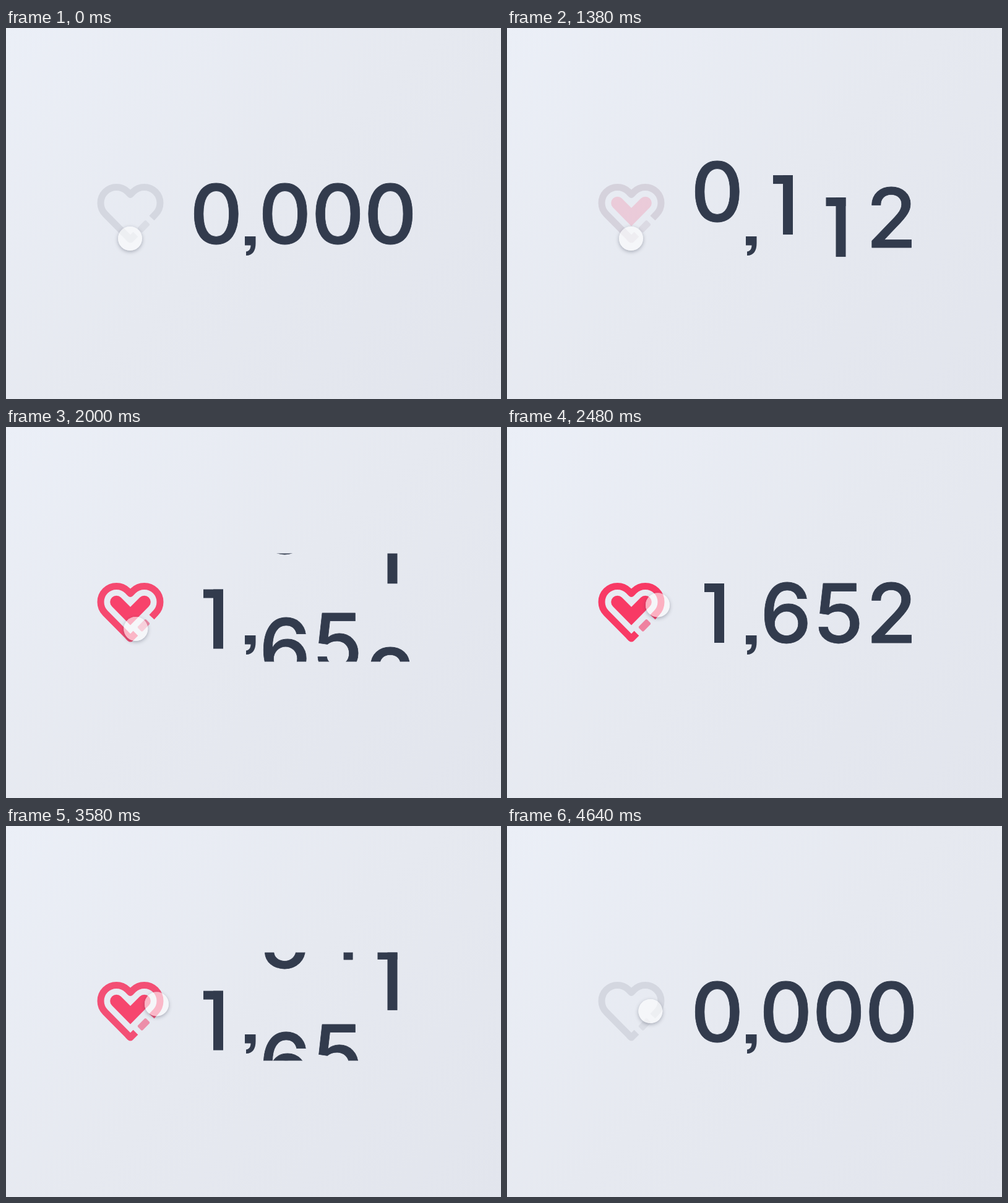
These frames come from a looping animation (800x600 px, 4660 ms). An HTML page with a canvas:

```html
<!DOCTYPE html>
<html lang="en">
<head>
<meta charset="utf-8">
<title>Like counter</title>
<style>
  html, body { margin: 0; width: 100%; height: 100%; overflow: hidden; background: #e6e9f0; }
  canvas { display: block; width: 800px; height: 600px; }
</style>
</head>
<body>
<canvas id="stage" width="800" height="600"></canvas>
<script>
const ctx = document.getElementById('stage').getContext('2d');
const LOOP = 4660;
const INK = '#323b4d';
const FONT = '500 132.5px Inter, "Open Sans", sans-serif';
const BASE = 349;     // baseline of the resting digits
const STEP = 201;     // distance between digits on a reel
const REELS = [
  { x: 340, digits: '01' },
  { x: 451, digits: '0123456' },
  { x: 536.5, digits: '012345' },
  { x: 621.5, digits: '012345678912' }
];
const GREY = [212, 215, 224], LIGHT_GREY = [218, 221, 229];
const PINK = [248, 58, 101], SOFT_PINK = [239, 130, 160];
const LOW = [200.5, 340.5], HIGH = [243.5, 288];

const clamp = v => Math.min(1, Math.max(0, v));
const span = (t, start, length) => clamp((t - start) / length);
const mix = (a, b, k) => a + (b - a) * k;
const blend = (a, b, k) => `rgb(${a.map((v, i) => mix(v, b[i], k)).join()})`;
const cubic = k => k < 0.5 ? 4 * k ** 3 : 1 - 4 * (1 - k) ** 3;

// Cubic Bézier easing through (x1, 0) and (x2, 1).
function ease(k, x1 = 0.704, x2 = 0.511) {
  if (k <= 0 || k >= 1) return clamp(k);
  let lo = 0, hi = 1;
  for (let i = 0; i < 30; i++) {
    const u = (lo + hi) / 2, v = 1 - u;
    if (3 * u * v * v * x1 + 3 * u * u * v * x2 + u ** 3 < k) lo = u; else hi = u;
  }
  return 3 * lo * lo - 2 * lo ** 3;
}

const backdrop = ctx.createLinearGradient(50, -50, 750, 650);
backdrop.addColorStop(0, '#ebeff7');
backdrop.addColorStop(0.5, '#e6e9f0');
backdrop.addColorStop(1, '#e2e5ed');

function digit(ch, cx, dy) {
  if (ch === '1') {
    // A one with a flat flag.
    ctx.fillRect(cx - 21, 253 + dy, 32, 14);
    ctx.fillRect(cx - 5, 253 + dy, 16, 96);
    return;
  }
  const m = ctx.measureText(ch);
  const x = cx - (m.actualBoundingBoxRight - m.actualBoundingBoxLeft) / 2;
  ctx.fillText(ch, x, BASE + dy);
  ctx.strokeText(ch, x, BASE + dy);
}

function drawReels(p) {
  ctx.save();
  ctx.beginPath();
  ctx.rect(290, 204.5, 400, 175);
  ctx.clip();
  ctx.fillStyle = ctx.strokeStyle = INK;
  ctx.lineWidth = 0.8; // slightly heavier than medium
  ctx.font = FONT;
  for (const { x, digits } of REELS) {
    const pos = p * (digits.length - 1);
    for (let i = 0; i < digits.length; i++) {
      const dy = (i - pos) * STEP;
      if (Math.abs(dy) < 170) digit(digits[i], x, dy);
    }
  }
  ctx.restore();
}

function drawComma() {
  ctx.fillStyle = INK;
  ctx.fill(new Path2D('M386 337H403.5V348C403.5 360 399 368 388 368V361.5C393 361 395.5 357 395.5 351.5H386Z'));
}

// Heart made of two lobes of radius r joined by diagonals, drawn from the tip round to the right lobe.
function heart(r) {
  const d = Math.SQRT1_2 * r, y = 283, left = 178.5, right = 223.5, q = Math.PI / 4;
  const notch = y - 2 * d + 22.5, tip = y + 2 * d + 23;
  const path = new Path2D();
  path.moveTo(201, tip);
  path.arc(left, y, r, 3 * q, 7 * q);
  path.lineTo(201, notch);
  path.arc(right, y, r, 5 * q, 9 * q);
  return { path, tip };
}

const outline = heart(25.5);
outline.path.lineTo(235.5, outline.tip - 34.5);
const { tip } = outline;
const corner = new Path2D(`M197 ${tip - 4}L201 ${tip}L209.5 ${tip - 8.5}`);
const core = heart(10.3).path;

function drawHeart(p) {
  const k = p * p;
  ctx.lineWidth = 11;
  ctx.lineJoin = 'round';
  ctx.strokeStyle = blend(GREY, PINK, k);
  ctx.stroke(outline.path);
  ctx.stroke(corner);

  ctx.save();
  ctx.translate(222.5, tip - 21.2);
  ctx.rotate(-Math.PI / 4);
  ctx.fillStyle = blend(LIGHT_GREY, SOFT_PINK, k);
  ctx.beginPath();
  ctx.roundRect(-9.5, -5.5, 19, 11, 2.2);
  ctx.fill();
  ctx.restore();

  ctx.save();
  ctx.globalAlpha = p;
  ctx.fillStyle = `rgb(${PINK})`;
  ctx.fill(core);
  ctx.restore();
}

function drawCursor(x, y) {
  const disc = new Path2D();
  disc.arc(x, y, 19.5, 0, 2 * Math.PI);
  const outside = new Path2D();
  outside.rect(0, 0, 800, 600);
  outside.addPath(disc);
  ctx.save();
  ctx.clip(outside, 'evenodd');
  ctx.shadowColor = 'rgba(50, 55, 75, 0.36)';
  ctx.shadowBlur = 6;
  ctx.shadowOffsetY = 2;
  ctx.fillStyle = '#f4f5f8';
  ctx.fill(disc);
  ctx.restore();
  ctx.fillStyle = 'rgba(255, 255, 255, 0.6)';
  ctx.fill(disc);
}

function draw(t) {
  const p = ease(span(t, 802, 1430)) - ease(span(t, 3189, 1430));
  const go = cubic(span(t, 1820, 460)) - cubic(span(t, 4460, 460));
  const bend = -6.5 * go * (1 - go);

  ctx.fillStyle = backdrop;
  ctx.fillRect(0, 0, 800, 600);
  drawHeart(p);
  drawReels(p);
  drawComma();
  drawCursor(mix(LOW[0], HIGH[0], go) + bend, mix(LOW[1], HIGH[1], go) + bend);
}

const start = performance.now();
function tick() {
  draw((performance.now() - start) % LOOP);
  requestAnimationFrame(tick);
}
tick();
</script>
</body>
</html>
```
